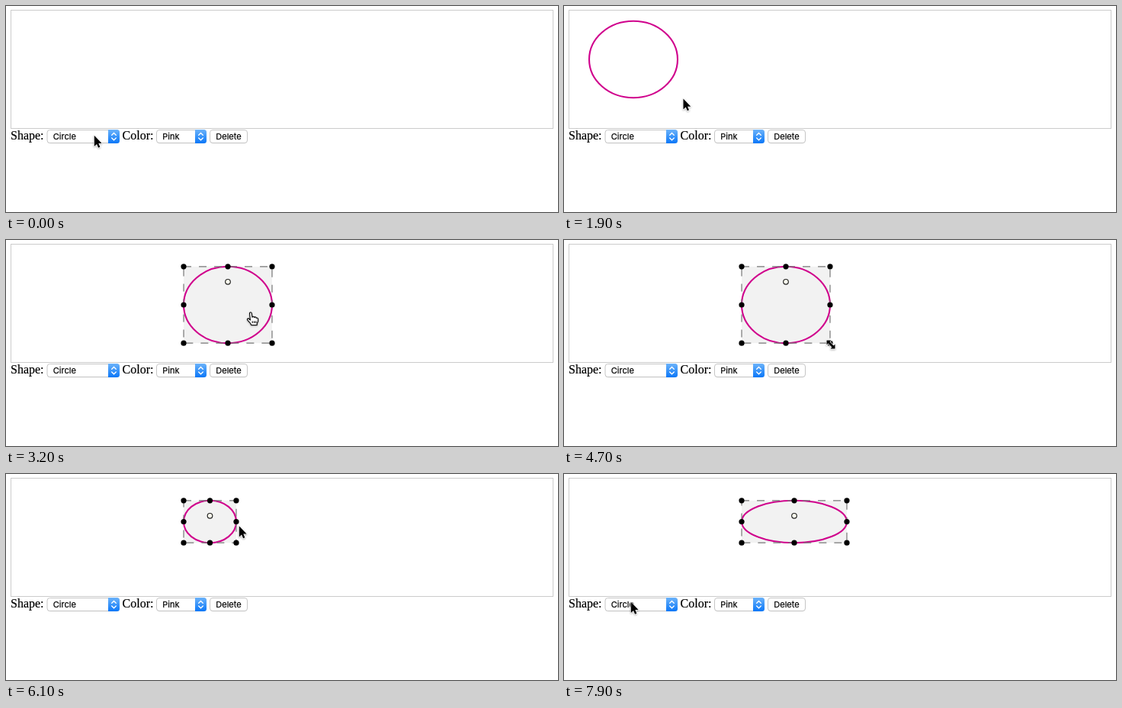
These frames come from a looping animation (724x270 px, 8 s). An HTML page:

```html
<!DOCTYPE html>
<html lang="en">
<head>
<meta charset="utf-8">
<title>Shape editor</title>
<style>
  html, body { margin: 0; width: 724px; height: 270px; overflow: hidden; background: #fff; }
  svg { display: block; }
  text { stroke: #000; stroke-width: .2px; }
  .label { font: 16px "Liberation Serif", "Times New Roman", serif; }
  .control { font: 11px Inter, "Liberation Sans", sans-serif; }
</style>
</head>
<body>
<svg width="724" height="270" viewBox="0 0 724 270">
  <defs>
    <linearGradient id="blue" x2="0" y2="1">
      <stop stop-color="#6cb3fa"/>
      <stop offset="1" stop-color="#0a77f8"/>
    </linearGradient>
    <filter id="soft" x="-50%" y="-50%" width="200%" height="200%">
      <feDropShadow dx="0" dy="1" stdDeviation=".8" flood-opacity=".35"/>
    </filter>
  </defs>

  <rect x="6.5" y="5.5" width="711" height="155" fill="#fff" stroke="#ccc"/>
  <text class="label" x="6" y="175">Shape:</text>
  <text class="label" x="152.6" y="175">Color:</text>
  <g id="controls"></g>

  <rect id="area" fill="#f2f2f2"/>
  <ellipse id="shape" fill="none" stroke="#d0008c" stroke-width="2.1"/>
  <g id="frame">
    <path id="dashes" fill="none" stroke="#777" stroke-width="1.2" stroke-dasharray="10 10"/>
    <g id="handles"></g>
    <circle id="pivot" r="3.3" fill="#fffff0" stroke="#222" stroke-width="1.2"/>
  </g>

  <g id="cursor" filter="url(#soft)" stroke-linejoin="round">
    <path id="arrow" transform="translate(.8 .8) scale(.88)" d="M0 0V16L3.7 12.6 6 18 8.6 16.9 6.3 11.6H11.2Z" stroke="#fff" stroke-width="1.4" paint-order="stroke"/>
    <path id="hand" d="M-1.5 1C-1.5-.6 1-.6 1.2 1L2 6.4C2.2 4.8 4.4 4.8 4.6 6.6 5 5.4 7 5.6 7.2 7.4 8 6.6 9.6 7.2 9.6 8.6V11.5L8.2 14.5V16.5H.8L-.6 14-4.3 9.8C-5.2 8.2-3.2 7.2-2 8.6L-.6 10ZM2.2 11.2V14M4.6 11.2V14M6.8 11.2V14" fill="#fff" stroke="#000" stroke-width="1.1"/>
    <path id="resize" transform="translate(1 2)" d="M-5.5-5.5H.5L-1.4-3.6 3.6 1.4 5.5-.5V5.5H-.5L1.4 3.6-3.6-1.4-5.5.5Z" stroke="#fff" stroke-width="1.4" paint-order="stroke"/>
  </g>
</svg>
<script>
const LOOP = 8000, STEP = 100;
const $ = id => document.getElementById(id);

function set(el, attrs) {
  for (const k in attrs) el.setAttribute(k, attrs[k]);
  return el;
}
function add(parent, tag, attrs) {
  const el = document.createElementNS("http://www.w3.org/2000/svg", tag);
  return parent.appendChild(set(el, attrs));
}
const show = (el, on) => { el.style.display = on ? "" : "none"; };

function control(x, width, text, isSelect) {
  const g = $("controls");
  add(g, "rect", { x: x + .5, y: 163, width: width - 1, height: 17.3, rx: 4, fill: "#ddd" });
  add(g, "rect", { x: x + .5, y: 162.5, width: width - 1, height: 17, rx: 3.5, fill: "#fff", stroke: "#c6c6c6" });
  add(g, "text", { x: x + 8.3, y: 175, class: "control" }).textContent = text;
  if (!isSelect) return;
  const r = x + width;
  add(g, "path", { d: `M${r - 15} 162h11.5q3.5 0 3.5 3.5v11q0 3.5-3.5 3.5h-11.5z`, fill: "url(#blue)" });
  add(g, "path", {
    d: `M${r - 10.3} 169.3l2.8-2.8 2.8 2.8M${r - 10.3} 173l2.8 2.8 2.8-2.8`,
    fill: "none", stroke: "#fff", "stroke-width": 1.3, "stroke-linecap": "round"
  });
}
control(53.5, 95.5, "Circle", true);
control(197, 66, "Pink", true);
control(267, 50, "Delete", false);

// Pointer moves: start, end, x, y, cursor
const home = { x: 115, y: 169, kind: "arrow" };
const moves = [
  [600, 1300, 91, 70, "arrow"],
  [1300, 1400, 115, 94, "arrow"],
  [1400, 1650, 173, 141, "arrow"],
  [1800, 2100, 121, 80, "hand"],
  [2200, 2500, 188, 88, "hand"],
  [2500, 3000, 321, 95, "hand"],
  [3500, 4000, 349, 135, "resize"],
  [4700, 5100, 302, 90, "resize"],
  [5500, 6300, 306, 60, "arrow"],
  [6500, 6700, 302, 60, "arrow"],
  [7000, 7200, 371, 61, "arrow"],
  [7300, 7900, 87, 167, "arrow"]
];
// Drags: start, end
const DRAW = [1300, 1650], MOVE = [2200, 3000], SCALE = [4700, 5100], WIDEN = [7000, 7200];

const clamp = (v, lo, hi) => Math.min(Math.max(v, lo), hi);
const progress = (t, [start, end]) => clamp((t - start) / (end - start), 0, 1);

function pointer(t) {
  let { x, y, kind } = home;
  for (const [start, end, toX, toY, toKind] of moves) {
    const p = progress(t, [start, end]);
    x += (toX - x) * p;
    y += (toY - y) * p;
    if (p >= .5) kind = toKind;
  }
  return { x, y, kind };
}

// Distance the pointer has covered within a drag
function dragged(t, [start, end]) {
  const a = pointer(start), b = pointer(clamp(t, start, end));
  return { x: b.x - a.x, y: b.y - a.y };
}

function bounds(t) {
  const origin = pointer(DRAW[0]);
  const drawn = dragged(t, DRAW), moved = dragged(t, MOVE);
  const scaled = dragged(t, SCALE), widened = dragged(t, WIDEN);
  const rx = drawn.x / Math.SQRT2, ry = drawn.y / Math.SQRT2;
  const swing = 10.5 * Math.sin(Math.PI * progress(t, WIDEN));
  const left = origin.x + moved.x - rx - swing;
  const top = origin.y + moved.y - ry;
  return { left, top, width: 2 * rx + scaled.x + widened.x, height: 2 * ry + scaled.y };
}

const grid = [];
for (const v of [0, .5, 1])
  for (const u of [0, .5, 1])
    if (u !== .5 || v !== .5) grid.push({ u, v, dot: add($("handles"), "circle", { r: 3.6 }) });

function draw(t) {
  const { left, top, width, height } = bounds(t);
  const cx = left + width / 2, cy = top + height / 2;
  const selected = t > MOVE[1];

  show($("shape"), t > DRAW[0]);
  show($("area"), selected);
  show($("frame"), selected);
  set($("shape"), { cx, cy, rx: width / 2, ry: height / 2 });
  set($("area"), { x: left, y: top, width, height });
  set($("dashes"), { d: `M${left} ${top}h${width}v${height}h${-width}z` });
  set($("pivot"), { cx, cy: top + 20 });
  for (const { u, v, dot } of grid) set(dot, { cx: left + u * width, cy: top + v * height });

  const { x, y, kind } = pointer(t);
  set($("cursor"), { transform: `translate(${x} ${y})` });
  for (const id of ["arrow", "hand", "resize"]) show($(id), id === kind);
}

const start = performance.now();
function tick() {
  const t = (performance.now() - start) % LOOP;
  draw(Math.floor(t / STEP) * STEP);
  requestAnimationFrame(tick);
}
tick();
</script>
</body>
</html>
```
